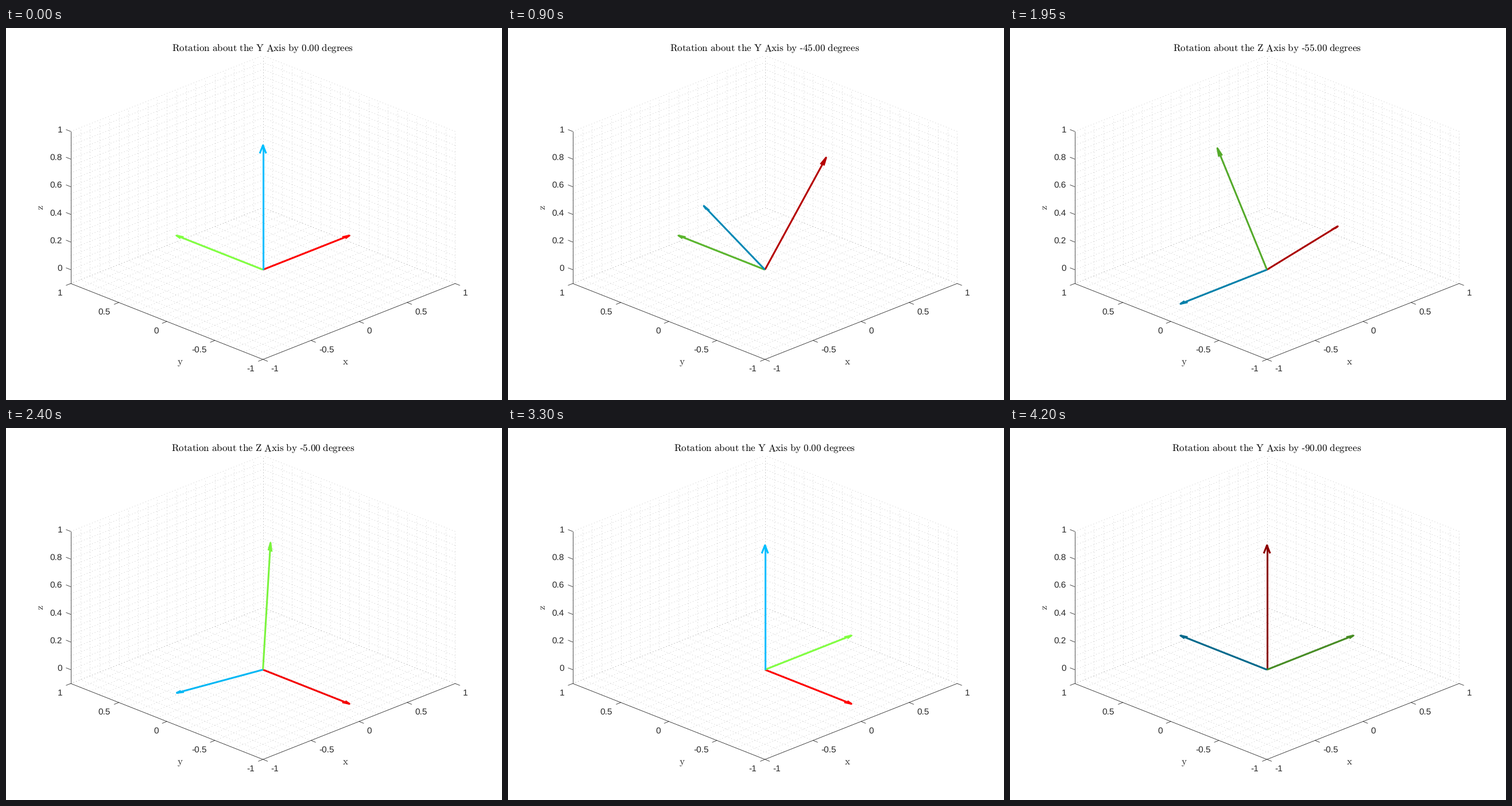
Animation, 864 px wide and 648 px high, one loop 4.25 s. Source, as a matplotlib script:

```python
import numpy as np
import matplotlib.pyplot as plt
from matplotlib.animation import FuncAnimation
from matplotlib.collections import LineCollection

plt.rcParams["mathtext.fontset"] = "cm"
plt.rcParams["text.hinting"] = "none"
plt.rcParams["font.family"] = "Liberation Sans"

W, H, DPI = 864, 648, 72
INK = "#262626"
STEP, TURN = 5, 19            # degrees per step, steps per quarter turn
HOLD = 9                      # extra ticks spent on the first pose
FRAMES = HOLD + 4 * TURN
SCALE, HEAD, WING = 0.9, 0.065, 0.0165
COLORS = np.array([[1, 0, 0], [0.5, 1, 0.25], [0, 0.75, 1]])
# body axis of each turn and the letter shown in the title
TURNS = [(1, "Y"), (2, "Z"), (0, "Z"), (1, "Y")]

fig = plt.figure(figsize=(W / DPI, H / DPI), dpi=DPI, facecolor="white")
ax = fig.add_axes([0, 0, 1, 1])
ax.set(xlim=(0, W), ylim=(H, 0))
ax.axis("off")


def project(p):
    x, y, z = np.moveaxis(np.asarray(p, float), -1, 0)
    return np.stack([447.6 + 167.4 * (x - y),
                     445.1 - 66.1 * (x + y) - 240.8 * (z + 0.1)], -1)


def rotation(axis, degrees):
    a = np.radians(degrees)
    i, j = (axis + 1) % 3, (axis + 2) % 3
    m = np.eye(3)
    m[i, i] = m[j, j] = np.cos(a)
    m[i, j], m[j, i] = -np.sin(a), np.sin(a)
    return m


def add_lines(segments, **style):
    ax.add_collection(LineCollection(segments, **style))


def label(x, y, s, size=15.43, color=INK, **kw):
    return ax.text(x, y, s, fontsize=size, color=color, **kw)


def roman(s):
    return r"$\mathrm{%s}$" % s.replace("-", "\u2010").replace(" ", r"\ ")


def draw_grid():
    z0, z1 = -0.1, 1
    lines = []
    for v in np.linspace(-1, 1, 21):
        lines += [[(v, -1, z0), (v, 1, z0)], [(-1, v, z0), (1, v, z0)],
                  [(v, 1, z0), (v, 1, z1)], [(1, v, z0), (1, v, z1)]]
    for z in np.linspace(z0, z1, 23):
        lines += [[(-1, 1, z), (1, 1, z)], [(1, -1, z), (1, 1, z)]]
    add_lines(project(lines), colors="#1a1a1a", alpha=0.3, linewidths=0.8,
              linestyles=(0, (1.25, 5)), zorder=1)


def draw_axes():
    edges = [[(-1, 1, 1), (-1, 1, -0.1)], [(-1, 1, -0.1), (-1, -1, -0.1)],
             [(-1, -1, -0.1), (1, -1, -0.1)]]
    lines = list(project(edges))

    def tick(p, dx, dy):
        q = project(p)
        lines.append(np.array([q, q + (dx, dy)]))
        return q

    for v in np.linspace(-1, 1, 5):
        x, y = tick((-1, v, -0.1), -8.3, 3.3)
        label(x - 14.6, y + 21, f"{v:g}", ha="right", va="baseline")
        x, y = tick((v, -1, -0.1), 8.3, 3.3)
        label(x + 13.6, y + 21, f"{v:g}", ha="left", va="baseline")
    for v in np.linspace(0, 1, 6):
        x, y = tick((-1, 1, v), -8.3, -3.3)
        label(x - 14.6, y + 1.8, f"{v:g}", ha="right", va="baseline")
    add_lines(lines, colors=INK, linewidths=0.8, zorder=2)

    label(591, 586, roman("x"), 17, ha="center", va="baseline")
    label(303.5, 586, roman("y"), 17, ha="center", va="baseline")
    label(60.5, 312.5, roman("z"), 17, ha="center", va="center", rotation=90)


def arrow(d):
    """Shaft and head outlines; the wings stay parallel to the floor."""
    flat = np.hypot(d[0], d[1])
    side = np.array([d[1], -d[0], 0]) / flat if flat > 1e-9 else np.array([1, -1, 0])
    tip, base = SCALE * d, SCALE * (1 - HEAD) * d
    wing = WING * side
    return project([np.zeros(3), tip]), project([base - wing, tip, base + wing])


draw_grid()
draw_axes()
title = label(447.5, 40, "", 17, "black", ha="center", va="baseline")
style = dict(lw=3.09, solid_capstyle="butt", solid_joinstyle="round")
arrows = [(ax.plot([], [], zorder=4 + i, **style)[0],
           ax.plot([], [], zorder=4 + i, **style)[0]) for i in range(3)]


def update(frame):
    turn, n = divmod(max(0, frame - HOLD), TURN)
    pose = np.eye(3)
    for axis, _ in TURNS[:turn]:
        pose = pose @ rotation(axis, -90)
    axis, name = TURNS[turn]
    pose = pose @ rotation(axis, -STEP * n)

    shade = 1 / (1 + n / 22)
    for i, parts in enumerate(arrows):
        for line, pts in zip(parts, arrow(pose[:, i])):
            line.set_data(pts[:, 0], pts[:, 1])
            line.set_color(COLORS[i] * shade)
    angle = f"-{STEP * n}.00" if n else "0.00"
    title.set_text(roman(f"Rotation about the {name} Axis by {angle} degrees"))
    return [title] + [line for parts in arrows for line in parts]


anim = FuncAnimation(fig, update, frames=FRAMES, interval=50,
                     repeat=True, repeat_delay=0, blit=False)
plt.show()
```
